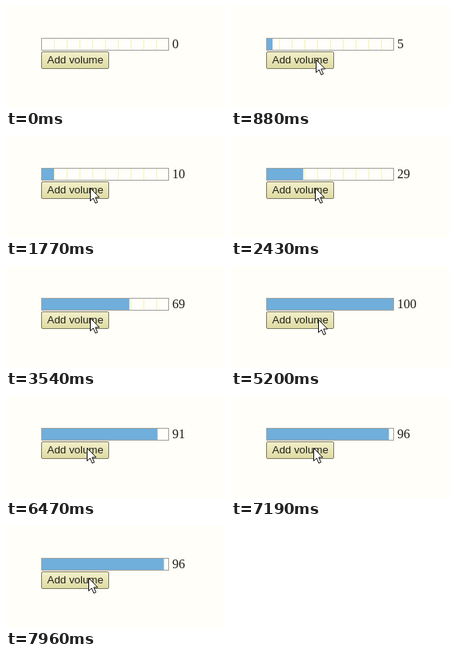
Animation, 274 px wide and 128 px high, one loop 8000 ms. Source, as an HTML page:

```html
<!DOCTYPE html>
<html lang="en">
<head>
<meta charset="utf-8">
<title>Volume bar</title>
<style>
  html, body { margin: 0; width: 100%; height: 100%; overflow: hidden; background: #fffef9; }
  svg { display: block; width: 274px; height: 128px; }
  .label { font: 13.333px "Liberation Sans", Arial, sans-serif; fill: #22221c; }
  .value { font: 16px "Liberation Serif", "Times New Roman", serif; fill: #1c1c14; }
</style>
</head>
<body>
<svg viewBox="0 0 274 128">
  <defs>
    <linearGradient id="face" x2="0" y2="1">
      <stop offset="0" stop-color="#f3f0cb"/>
      <stop offset="1" stop-color="#dedba3"/>
    </linearGradient>
  </defs>
  <rect x="44" y="40" width="160" height="16" fill="#fffefb"/>
  <path id="marks" stroke="#f4f3b4" fill="none"/>
  <rect id="fill" x="44" y="40" height="16" fill="#70aedb"/>
  <rect x="44.5" y="40.5" width="159" height="15" fill="none" stroke="#a3a39b"/>
  <text id="value" class="value" x="208" y="53"></text>
  <rect x="44.5" y="57.5" width="84" height="21" rx="1.5" fill="url(#face)" stroke="#7f7d66"/>
  <text class="label" x="51.5" y="72">Add volume</text>
  <path id="cursor" d="M.5 .5V16.5L4.2 13 6.9 19.3 9.5 18.2 6.8 12H11.8Z" fill="#fff" stroke="#111"/>
</svg>
<script>
  const LOOP = 8000, TICK = 57, STEP = 10, MAX = 100;
  const $ = id => document.getElementById(id);
  const fill = $('fill'), value = $('value'), cursor = $('cursor');

  // Clicks come in bursts of an even rhythm: count, interval in ms.
  const bursts = [[3, 589], [9, 190], [6, 286], [3, 250], [1, 560], [5, 240]];
  const clicks = [];
  let clock = 0;
  for (const [count, gap] of bursts)
    for (let i = 0; i < count; i++) clicks.push(clock += gap);

  // The pointer enters from below, then drifts over the button: time, x, y.
  const path = [
    [60, 114, 130], [580, 106, 68], [1700, 105, 65], [3500, 105, 65],
    [4200, 109, 73], [5200, 109, 67], [6400, 101, 65], [7400, 103, 65]
  ];

  let marks = '';
  for (let x = 60.5; x < 200; x += 16) marks += `M${x} 41V55`;
  $('marks').setAttribute('d', marks);

  // Each click adds a step; the level drains by one per tick.
  function volumeAt(t) {
    let v = 0, last = 0;
    const drain = time => {
      const n = Math.floor(time / TICK);
      v = Math.max(0, v - (n - last));
      last = n;
    };
    for (const c of clicks) {
      if (c > t) break;
      drain(c);
      v = Math.min(MAX, v + STEP);
    }
    drain(t);
    return v;
  }

  function pointerAt(t) {
    let i = 0;
    while (i < path.length - 2 && t >= path[i + 1][0]) i++;
    const [t0, x0, y0] = path[i], [t1, x1, y1] = path[i + 1];
    const p = Math.min(1, Math.max(0, (t - t0) / (t1 - t0)));
    const e = p * p * (3 - 2 * p);
    return [x0 + (x1 - x0) * e, y0 + (y1 - y0) * e].map(Math.round);
  }

  function draw(t) {
    const v = volumeAt(t);
    fill.setAttribute('width', v * 1.6);
    value.textContent = v;
    cursor.setAttribute('transform', `translate(${pointerAt(t)})`);
  }

  const start = performance.now();
  function frame() {
    draw((performance.now() - start) % LOOP);
    requestAnimationFrame(frame);
  }
  frame();
</script>
</body>
</html>
```
